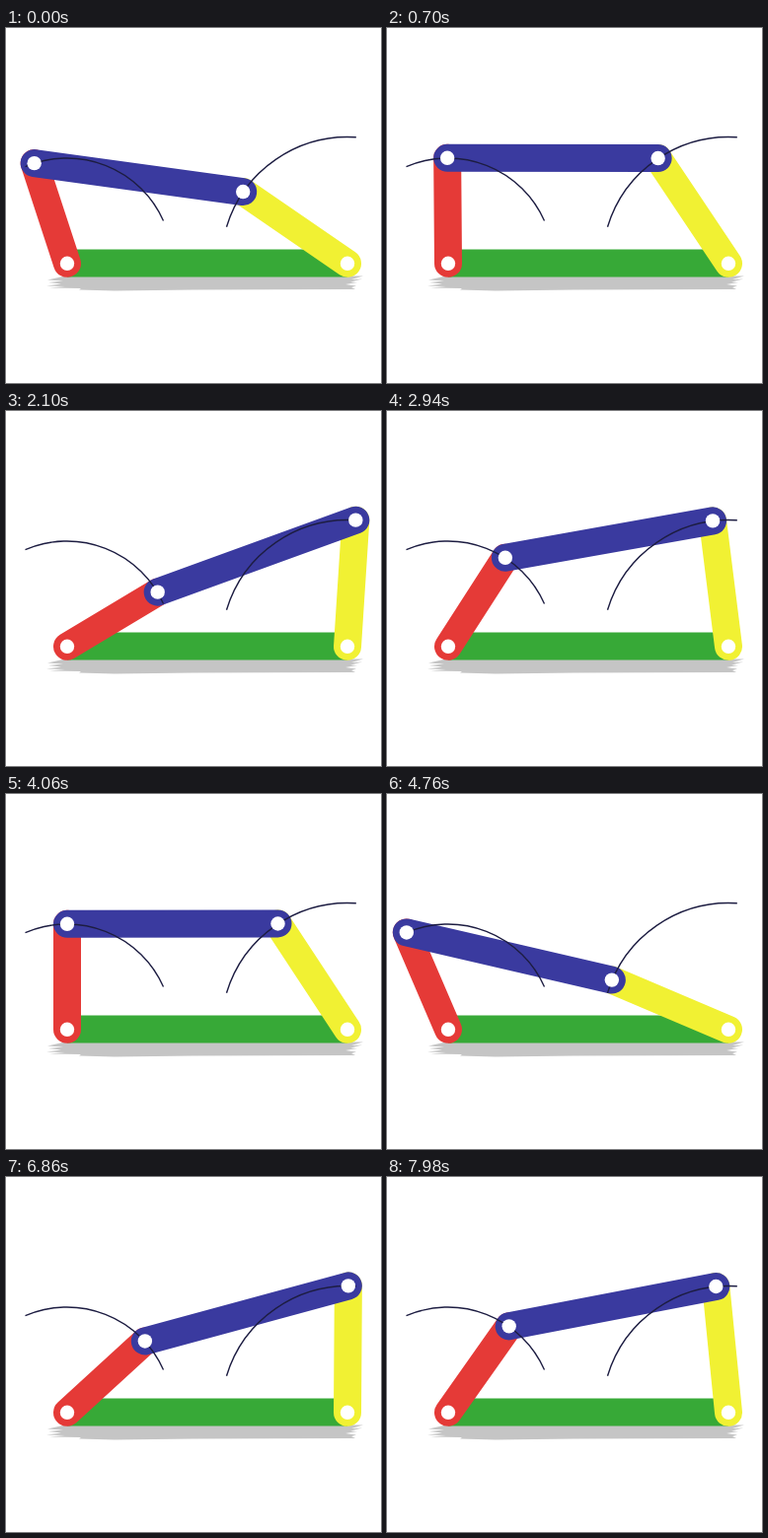
Recreate the animation shown at these times as an HTML page. Size 380 px wide and 360 px high, loop 8000 ms.

```html
<!DOCTYPE html>
<html lang="en">
<head>
<meta charset="utf-8">
<title>Four-bar linkage</title>
<style>
  html, body { margin: 0; width: 100%; height: 100%; overflow: hidden; background: #fff; }
  svg { display: block; width: 380px; height: 360px; }
  .bar { stroke-width: 28; stroke-linecap: round; }
  .trace { fill: none; stroke: #1d1d42; stroke-width: 1.4; }
</style>
</head>
<body>
<svg viewBox="0 0 380 360">
  <path fill="#c5c5c5" d="M62 251 L362 251.5 L350 255 L361 254.5 L349 257.5 L356 258 L344 260
    L355 261.5 L350 263 L354 265 L190 265.5 L110 266.5 L74 265.5 L76 264 L44 263.5 L60 262
    L41 261.5 L56 259.5 L43 258 L58 256.5 L42 255.5 Z"/>
  <path stroke="#37a937" stroke-width="28" d="M62 238.5H346"/>
  <line id="red" class="bar" stroke="#e53a37"/>
  <line id="yellow" class="bar" stroke="#f1f133"/>
  <line id="blue" class="bar" stroke="#3a3a9f"/>
  <path class="trace" d="M19.5 140.7A107 107 0 0 1 159.5 195.5"/>
  <path class="trace" d="M223.5 201.7A128.4 128.4 0 0 1 354.8 110.8"/>
  <g id="holes" fill="#fff"></g>
</svg>
<script>
  const LOOP = 8000;
  const left = { x: 62, y: 238.8 }, right = { x: 346, y: 238.8 };
  const CRANK = 107, COUPLER = 213.5, ROCKER = 128.4;

  // Tilt of the coupler over time: [ms, degrees above horizontal]
  const tiltKeys = [
    [0, -7.8], [560, -1.4], [1120, 3.9], [1400, 7.3], [1800, 12.8], [2240, 23.3],
    [2550, 16], [2940, 10.1], [3360, 6.4], [4060, 0.1], [4480, -6], [4900, -16.5],
    [5250, -7.3], [5600, -2], [6230, 5.6], [6860, 15.2], [7200, 23.3],
    [7590, 16.2], [7980, 10.9], [8000, 10.7]
  ];

  const byId = id => document.getElementById(id);
  const bars = { red: byId('red'), yellow: byId('yellow'), blue: byId('blue') };
  const holes = Array.from({ length: 4 }, () => {
    const hole = document.createElementNS('http://www.w3.org/2000/svg', 'circle');
    hole.setAttribute('r', 7.2);
    return byId('holes').appendChild(hole);
  });

  function set(node, attrs) {
    for (const name in attrs) node.setAttribute(name, attrs[name]);
  }

  function placeBar(bar, a, b) {
    set(bar, { x1: a.x, y1: a.y, x2: b.x, y2: b.y });
  }

  function tiltAt(ms) {
    const i = Math.max(1, tiltKeys.findIndex(key => key[0] >= ms));
    const [t0, a] = tiltKeys[i - 1], [t1, b] = tiltKeys[i];
    return a + (b - a) * (ms - t0) / (t1 - t0);
  }

  // Upper crossing of two circles
  function crossing(a, ra, b, rb) {
    const dx = b.x - a.x, dy = b.y - a.y, d = Math.hypot(dx, dy);
    const along = (d * d + ra * ra - rb * rb) / (2 * d);
    const off = Math.sqrt(Math.max(0, ra * ra - along * along));
    return { x: a.x + (along * dx + off * dy) / d, y: a.y + (along * dy - off * dx) / d };
  }

  function draw(ms) {
    const tilt = tiltAt(ms) * Math.PI / 180;
    const dx = COUPLER * Math.cos(tilt), dy = -COUPLER * Math.sin(tilt);
    const p = crossing(left, CRANK, { x: right.x - dx, y: right.y - dy }, ROCKER);
    const q = { x: p.x + dx, y: p.y + dy };
    placeBar(bars.red, left, p);
    placeBar(bars.yellow, right, q);
    placeBar(bars.blue, p, q);
    [left, right, p, q].forEach((c, i) => set(holes[i], { cx: c.x, cy: c.y }));
  }

  const start = performance.now();
  function tick() {
    draw((performance.now() - start) % LOOP);
    requestAnimationFrame(tick);
  }
  tick();
</script>
</body>
</html>
```
